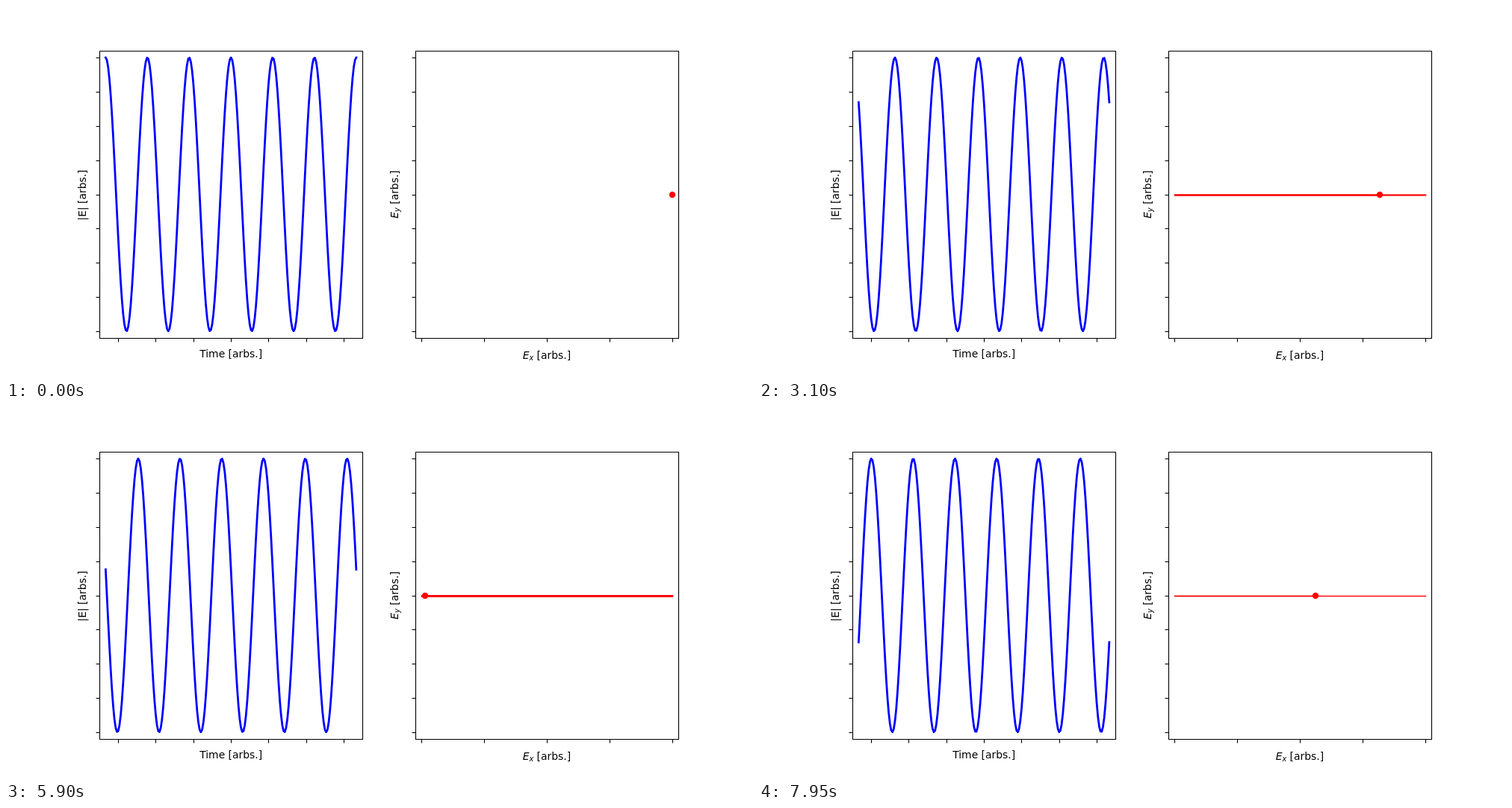
These frames come from a looping animation (1000x500 px, 8 s). An HTML page with a canvas:

```html
<!DOCTYPE html>
<html lang="en">
<head>
<meta charset="utf-8">
<title>Linear polarisation</title>
<style>
  html, body { margin: 0; width: 100%; height: 100%; overflow: hidden; background: #fff; }
  canvas { display: block; }
</style>
</head>
<body>
<canvas id="stage" width="1000" height="500"></canvas>
<script>
const ctx = document.getElementById('stage').getContext('2d');

const STEP_MS = 50, STEPS = 160;
const SAMPLES = 201, CYCLES = 6;
const PHASE_STEP = 2 * Math.PI * CYCLES / (SAMPLES - 1);
const PT = 100 / 72;                       // pixels per point
const TOP = 60, HEIGHT = 385, WIDTH = 775 / 2.2;
const MID_Y = TOP + HEIGHT / 2, AMP_X = WIDTH / 2.1, AMP_Y = HEIGHT / 2.1;
const LEFT = { x: 125, mid: 125 + WIDTH / 2 };
const RIGHT = { x: 900 - WIDTH, mid: 900 - WIDTH / 2 };

const snap = v => Math.floor(v + 0.5) + 0.5;

function line(points, color, width) {
  ctx.strokeStyle = color;
  ctx.lineWidth = width;
  ctx.beginPath();
  for (const [x, y] of points) ctx.lineTo(x, y);
  ctx.stroke();
}

function axes(panel, tickGap, tickSide) {
  const x0 = snap(panel.x), x1 = snap(panel.x + WIDTH);
  const y0 = snap(TOP), y1 = snap(TOP + HEIGHT);
  const width = 0.8 * PT;
  ctx.lineCap = 'butt';
  for (let k = -tickSide; k <= tickSide; k++) {
    const x = snap(panel.mid + k * tickGap);
    line([[x, y1], [x, y1 + 5]], '#000', width);
  }
  for (let k = -4; k <= 4; k++) {
    const y = snap(MID_Y + k * AMP_Y / 4);
    line([[x0 - 5, y], [x0, y]], '#000', width);
  }
  ctx.strokeStyle = '#000';
  ctx.lineWidth = width;
  ctx.strokeRect(x0, y0, x1 - x0, y1 - y0);
}

// Each part is [text, style, size in points, baseline drop].
function label(parts, x, y, angle) {
  const fontOf = ([, style, size]) => `${style} ${size * PT}px "DejaVu Sans", sans-serif`;
  const widths = parts.map(p => { ctx.font = fontOf(p); return ctx.measureText(p[0]).width; });
  ctx.save();
  ctx.translate(x, y);
  ctx.rotate(angle);
  ctx.fillStyle = '#000';
  let pen = -widths.reduce((a, b) => a + b) / 2;
  parts.forEach((p, i) => {
    ctx.font = fontOf(p);
    ctx.fillText(p[0], pen, p[3] || 0);
    pen += widths[i];
  });
  ctx.restore();
}

const plain = text => [[text, 'normal', 10]];
const component = sub => [['E', 'italic', 10], [sub, 'italic', 7, 2.3], [' [arbs.]', 'normal', 10]];

function wave(phase) {
  const points = Array.from({ length: SAMPLES }, (_, i) => [
    LEFT.mid + AMP_X * (2 * i / (SAMPLES - 1) - 1),
    MID_Y - AMP_Y * Math.cos(i * PHASE_STEP - phase)
  ]);
  ctx.lineCap = 'square';
  ctx.lineJoin = 'round';
  line(points, '#00f', 2 * PT);
}

// The soft edges of the trail build up with every sweep.
function trail(x0, x1, passes) {
  if (!passes) return;
  const y = Math.floor(MID_Y + 0.5);
  ctx.fillStyle = '#f00';
  ctx.fillRect(x0, y, x1 - x0, 1);
  ctx.globalAlpha = Math.min(1, passes * (PT - 1) / 2);
  ctx.fillRect(x0, y - 1, x1 - x0, 1);
  ctx.fillRect(x0, y + 1, x1 - x0, 1);
  ctx.globalAlpha = 1;
}

function field(step) {
  const phase = step * PHASE_STEP;
  const sweeps = Math.floor(phase / Math.PI);
  const x = Math.floor(RIGHT.mid + AMP_X * Math.cos(phase) + 0.5);
  const odd = sweeps % 2;
  const merged = step + 1 >= 128;          // long trails collapse to one out-and-back stroke
  trail(snap(RIGHT.mid - AMP_X) - 0.7, x, merged ? 2 : sweeps + odd);
  trail(x, snap(RIGHT.mid + AMP_X) + 0.7, merged ? 1 : sweeps + 1 - odd);
  ctx.fillStyle = '#f00';
  ctx.beginPath();
  ctx.arc(x, Math.floor(MID_Y + 0.5), 3 * PT, 0, 2 * Math.PI);
  ctx.fill();
}

function draw() {
  const step = Math.floor(performance.now() / STEP_MS) % STEPS;
  ctx.fillStyle = '#fff';
  ctx.fillRect(0, 0, 1000, 500);
  wave(step);
  field(step);
  axes(LEFT, 0.3 * AMP_X, 3);
  axes(RIGHT, AMP_X / 2, 2);
  label(plain('Time [arbs.]'), LEFT.mid, 471, 0);
  label(plain('|E| [arbs.]'), 107, MID_Y + 1, -Math.PI / 2);
  label(component('x'), RIGHT.mid, 473, 0);
  label(component('y'), 525, MID_Y, -Math.PI / 2);
  requestAnimationFrame(draw);
}
draw();
</script>
</body>
</html>
```
